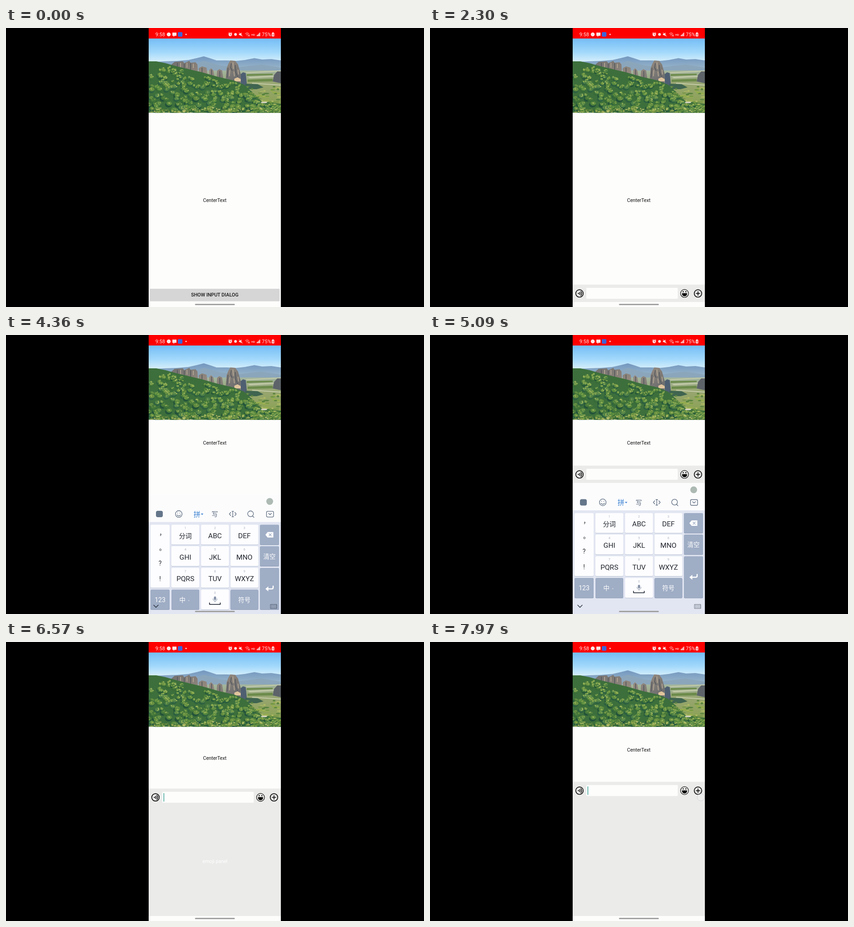
Write an HTML page that moves like this. It is 917x611 px and loops after 8000 ms.

```html
<!DOCTYPE html>
<html lang="en">
<head>
<meta charset="utf-8">
<title>Input dialog</title>
<style>
html, body { margin: 0; width: 100%; height: 100%; overflow: hidden; background: #000; }
svg { display: block; width: 917px; height: 611px; }
text { font-family: Roboto, "Noto Sans CJK SC", "Noto Sans CJK", sans-serif; text-anchor: middle; }
.line { fill: none; stroke-linecap: round; stroke-linejoin: round; }
</style>
</head>
<body>
<svg viewBox="0 0 917 611">
  <defs>
    <clipPath id="phone"><rect x="313" width="290" height="611"/></clipPath>
    <clipPath id="frame"><rect x="313" y="23" width="290" height="162.5"/></clipPath>
    <linearGradient id="sky" x2="0" y2="1">
      <stop offset="0" stop-color="#74bdf6"/><stop offset=".5" stop-color="#a2d8fb"/><stop offset=".85" stop-color="#d6effb"/>
    </linearGradient>
    <linearGradient id="hill" x2="0" y2="1">
      <stop offset="0" stop-color="#7397bf"/><stop offset="1" stop-color="#a6c0cd"/>
    </linearGradient>
    <linearGradient id="plain" x2="0" y2="1">
      <stop offset="0" stop-color="#a3b5a0"/><stop offset=".3" stop-color="#98a672"/><stop offset="1" stop-color="#86a048"/>
    </linearGradient>
    <linearGradient id="stone" x2=".9" y2=".3">
      <stop offset="0" stop-color="#71706f"/><stop offset=".5" stop-color="#94897e"/><stop offset="1" stop-color="#5d6369"/>
    </linearGradient>
  </defs>
  <rect width="917" height="611"/>
  <g clip-path="url(#phone)">
    <rect x="313" width="290" height="611" fill="#fdfdfc"/>

    <g clip-path="url(#frame)">
      <rect x="313" y="23" width="290" height="60" fill="url(#sky)"/>
      <path fill="url(#hill)" d="M313 75L345 73 375 72 400 70 418 66 434 62 447 66 462 71 485 71 505 72 524 70 545 66 562 69 582 68 603 71V100H313Z"/>
      <path fill="#8ba6bb" d="M400 84L434 72 470 82 510 86 560 80 603 87V104H400Z"/>
      <rect x="420" y="93" width="183" height="93" fill="url(#plain)"/>
      <path fill="#c4cba9" d="M525 97L603 93V95L528 99ZM530 107L603 104V106L535 110ZM540 120L603 124V126L540 122Z"/>
      <path fill="#6c8b4b" d="M528 101L585 100V103L528 105ZM530 113L585 111V117L530 118Z"/>
      <path fill="url(#stone)" d="M363 80L370 74 388 73 391 77 402 72 405 76 416 75 420 80 421 96H363ZM423 88L430 84 440 87 442 103H423ZM446 92L450 88 455 93 457 106H446ZM463 94L468 90 474 93 477 113H462ZM482 112L484 88 488 78 492 71 503 72 509 80 515 101 514 125H484ZM585 117L588 103 595 95 603 95V121Z"/>
      <path class="line" stroke="#575b60" stroke-width="1.800" d="M376 77v12M391 79v14M405 78v16M430 88v12M451 92v10M469 95v14M487 88l-2 20M494 78l-1 9 3 6M503 82l1 15 4 10"/>
      <path class="line" stroke="#b0a391" stroke-width="2" d="M383 77v8M397 77v9M411 79v8M498 76l1 13M491 93l-1 12M500 96l1 9M509 92l1 9"/>
      <path fill="#4f5f72" d="M515 101L520 97 526 99 529 130H515Z"/>
      <path fill="#3f6450" d="M525 122L552 123 565 130 550 134H525Z"/>
      <path fill="#e0c49c" d="M501 111L508 108 515 112V117H501Z"/>
      <path fill="#3d6f3c" d="M313 73L330 73 350 77 375 84 400 90 430 97 465 107 500 115 522 124 540 140 560 160 603 166V186H313Z"/>
      <g id="leaves"></g>
    </g>

    <rect x="313" width="290" height="23" fill="#f00"/>
    <g fill="#ffe6e6">
      <text x="338.3" y="18" font-size="11">9:58</text>
      <circle cx="357" cy="14" r="4.300"/>
      <path d="M365 10h9v7h-4l-2.500 2.500v-2.500h-2.500z"/>
      <rect x="377" y="9" width="10" height="10" rx="2" fill="#3f62d8"/>
      <circle cx="395" cy="14" r="1.500"/>
      <circle cx="492" cy="14.300" r="3.700"/>
      <circle cx="503.500" cy="14" r="3"/>
      <path d="M511 12.500h2.500l3-2.500v8l-3-2.500H511z"/>
      <text x="542" y="16.500" font-size="6" font-weight="500">HD</text>
      <text x="571.500" y="18" font-size="11">75%</text>
      <rect x="583" y="10.500" width="5.500" height="8" rx="1"/><rect x="584.500" y="9.500" width="2.500" height="2"/>
      <path d="M550 15.500h1.500V18H550zm2-1.500h1.500v4H552zm2-2h1.500v6H554zm2-2h1.500v8H556z"/>
    </g>
    <g class="line" stroke="#ffe6e6">
      <path d="M488 11.500l2-1.700M496 11.500l-2-1.700M511.500 10l7.500 8M525 12.500q4-3.500 8 0M526.800 14.800q2.200-2 4.400 0M529 17.200v.1M532 15v3M534 18v-3"/>
      <path stroke="#f00" stroke-width=".9" d="M492 12.300v2.300l1.700 .8M586.200 12.500l-1.200 2.300h1.700l-1.200 2.200"/>
    </g>

    <text id="label" x="458" font-size="10.700" fill="#111">CenterText</text>
    <g id="button">
      <rect x="315.500" y="571" width="285" height="27.500" rx="1.500" fill="#d6d6d6"/>
      <text x="458" y="587.700" font-size="10.700" font-weight="500" fill="#171717">SHOW INPUT DIALOG</text>
    </g>

    <g id="dialog">
      <rect x="313" width="290" height="340" fill="#ebebea"/>
      <rect x="343" y="7" width="200.500" height="24" rx="1.500" fill="#fdfdfc"/>
      <rect id="caret" x="345.800" y="10" width="1.200" height="18.500" fill="#12907f"/>
      <g class="line" stroke="#0a0a0a" stroke-width="1.700">
        <circle cx="328" cy="19.300" r="8.200"/>
        <circle cx="558.400" cy="19.300" r="8.700" stroke-width="1.200"/>
        <circle cx="587.900" cy="19.300" r="8.200"/>
        <path d="M584 19.300h7.800M587.900 15.400v7.800M328.300 16.800q2 2.500 0 5M331 14.800q3.600 4.500 0 9"/>
      </g>
      <path d="M552.900 18.800h11q0 6.700-5.500 6.700T552.900 18.800z"/>
      <circle cx="325.600" cy="19.300" r="1.300"/><circle cx="555.500" cy="15.500" r="1.300"/><circle cx="561.300" cy="15.500" r="1.300"/>
    </g>
    <text id="panel" x="458.500" y="484" font-size="10.700" fill="#fff">emoji panel</text>
    <rect x="313" y="600" width="290" height="11" fill="#fdfdfc"/>

    <g id="keyboard">
      <rect x="313" y="350" width="290" height="60" fill="#fcfcfd"/>
      <rect x="313" y="410" width="290" height="240" fill="#e2e6f2"/>
      <circle cx="578.500" cy="365" r="7.500" fill="#adbab3"/>
      <g id="tools">
        <rect x="329" y="385.500" width="15" height="14" rx="4" fill="#65768a"/>
        <g class="line" stroke="#5c6b7e" stroke-width="1.300">
          <circle cx="379" cy="392.500" r="7.300"/><path d="M375 394.500q4 4.500 8 0M376.500 390v.6M381.500 390v.6"/>
          <path d="M493 389l-3 3.500 3 3.500M502 389l3 3.500-3 3.500M495.500 386.500h4M497.500 386.500v12M495.500 398.500h4"/>
          <circle cx="536.500" cy="392" r="6.300"/><path d="M541 397l3 3"/>
          <rect x="571.500" y="386.500" width="15.500" height="12.500" rx="2.500"/><path d="M576 391l3.200 3 3.200-3"/>
        </g>
        <text x="419" y="398" font-size="15" font-weight="500" fill="#347dd0">拼</text>
        <path d="M427.500 391.500h5.500l-2.750 3z" fill="#347dd0"/>
        <text x="458" y="397.500" font-size="14" fill="#5c6b7e">写</text>
      </g>
      <g id="keys"></g>
      <path class="line" stroke="#111827" stroke-width="1.600" d="M446.500 587v3.500h23.500V587"/>
      <rect x="456" y="573" width="5" height="8" rx="2.500" fill="#8793a8"/>
      <path class="line" stroke="#8793a8" d="M454 578q0 5 4.500 5t4.500-5M458.500 583v2.500"/>
      <path fill="#fff" d="M569 438l5-6h12.500v12H574z"/>
      <path class="line" stroke="#9fadc5" stroke-width="1.500" d="M577 435.500l5 5M582 435.500l-5 5"/>
      <path class="line" stroke="#fff" stroke-width="2.600" d="M586 550.500v3q0 3-3 3h-9"/>
      <path fill="#fff" d="M569 556.500l6.500-5.500v11z"/>
    </g>
    <g id="navIcons" class="line" stroke="#222b38" stroke-width="1.300">
      <path d="M324 591.500l5 5 5-5"/>
      <path stroke-dasharray="1.200 2" stroke-linecap="butt" stroke="#56606f" d="M582 592h11M582 594.500h11M582 597h11"/>
      <rect x="580.500" y="590" width="13.500" height="9" stroke-width=".6"/>
    </g>
    <rect x="414.500" y="604" width="87.500" height="3" rx="1.500" fill="#a2a2a2"/>
    <circle id="touch" r="8" fill="#fff" stroke="#b9b9c2" stroke-width=".9"/>
  </g>
</svg>
<script>
const $ = id => document.getElementById(id);
const add = (parent, tag, attrs, text) => {
  const node = document.createElementNS('http://www.w3.org/2000/svg', tag);
  for (const k in attrs) node.setAttribute(k, attrs[k]);
  if (text) node.textContent = text;
  parent.append(node);
};

// Foliage: seeded round bushes, each a shadow, a body and sunlit tufts.
let seed = 11;
const rnd = () => (seed = seed * 16807 % 2147483647) / 2147483647;
const pick = list => list[Math.floor(rnd() * list.length)];
const blob = (cx, cy, rx, ry, fill) => add($('leaves'), 'ellipse', { cx, cy, rx, ry, fill });
const treeLine = x => x < 335 ? 75 : x < 522 ? 75 + (x - 335) * .26 : Math.min(165, 124 + (x - 522) * 1.05);
const shadows = ['#23533a', '#2d6040', '#376a38'];
const bodies = ['#47793a', '#588a3e', '#668f40', '#4f8148'];
const lights = ['#7fa34b', '#92b054', '#a9bd62', '#6f9a48', '#48783a'];

for (let i = 0; i < 60; i++) {
  blob(530 + rnd() * 73, 128 + rnd() * 42, 2 + rnd() * 5, .8 + rnd() * 1.5, pick(['#6f9440', '#94ac4f', '#5a8440', '#adb964']));
}
blob(566, 163, 7, 1.6, '#dcd9cb');
const BUSHES = 260;
for (let i = 0; i < BUSHES; i++) {
  const x = 312 + rnd() * 292, top = treeLine(x) + 3, depth = i / BUSHES;
  const y = top + (186 - top) * depth, r = 3 + rnd() * 3 + depth * 3;
  blob(x - 1, y + r * .4, r, r * .75, pick(shadows));
  blob(x + .5, y, r * .8, r * .6, pick(bodies));
  for (let j = 0; j < 8; j++) {
    const a = rnd() * 6.28, d = rnd() * r * .8;
    blob(x + 1 + Math.cos(a) * d, y - 1 + Math.sin(a) * d * .65, .6 + rnd() * 1.2, .5 + rnd() * .8, pick(lights));
  }
}
for (let i = 0; i < 150; i++) {
  blob(313 + rnd() * 290, 175 + rnd() * 11, 1 + rnd() * 2, .6 + rnd(), pick(['#a9b35c', '#8ea24b', '#bfc573', '#5d7f3a']));
}

const keys = $('keys');
const key = (x, y, w, h, dark) => {
  add(keys, 'rect', { x, y: y + 1, width: w, height: h, rx: 2.5, fill: dark ? '#8f9db6' : '#b9c1d3' });
  add(keys, 'rect', { x, y, width: w, height: h, rx: 2.5, fill: dark ? '#9fadc5' : '#fdfdff' });
};
const glyph = (s, x, y, size, fill) => add(keys, 'text', { x, y, 'font-size': size, fill }, s);
const cols = [363, 428, 492.5], rows = [416, 463, 510.5, 558];
['分词', 'ABC', 'DEF', 'GHI', 'JKL', 'MNO', 'PQRS', 'TUV', 'WXYZ'].forEach((s, i) => {
  const x = cols[i % 3], y = rows[i / 3 | 0];
  key(x, y, 61, 43.5);
  glyph(s, x + 30.5, y + 29, i ? 15.5 : 14, '#20242c');
  glyph(String(i + 1), x + 30.5, y + 9.5, 7, '#aab2c0');
});
key(317, 416, 42, 138);
[['，', 343, 438], ['。', 343, 471], ['?', 338, 505], ['!', 338, 539]].forEach(([s, x, y]) => glyph(s, x, y, 14, '#20242c'));
key(557, 416, 42, 43.5, true);
key(557, 463, 42, 43.5, true);
key(557, 510.5, 42, 91, true);
key(317, 558, 42, 43.5, true);
key(363, 558, 61, 43.5, true);
key(428, 558, 61, 43.5);
key(492.5, 558, 61, 43.5, true);
glyph('清空', 578, 490, 13.5, '#fff');
glyph('123', 338, 585, 14, '#fff');
glyph('中', 387, 585, 13.5, '#fff');
glyph('※', 401, 583, 6, '#dfe5ef');
glyph('符号', 523, 585, 13.5, '#fff');
glyph('0', 458.5, 567.5, 7, '#aab2c0');

const LOOP = 8000, KB_TRAVEL = 276;
const linear = p => p;
const outCubic = p => 1 - (1 - p) ** 3;
const inCubic = p => p ** 3;
const inOut = p => (1 - Math.cos(Math.PI * p)) / 2;
// Each move: start, end, target, easing.
const track = (t, value, moves) => {
  for (const [a, b, to, ease] of moves) {
    if (t < a) break;
    value += (to - value) * ease(Math.min(1, (t - a) / (b - a)));
  }
  return value;
};
const barMoves = [[1900, 2220, 562, outCubic], [4460, 4820, 286, inOut], [6210, 6580, 321, inOut], [7800, 8180, 286, inOut]];
const kbMoves = [[4160, 4527, 0, outCubic], [6080, 6328, KB_TRAVEL, inCubic]];
const labelSteps = [[4200, 236], [6100, 254], [7780, 236]];
const caretOn = [[4400, 5090], [5610, 6830], [7330, 8000]];
const touches = [[1700, 1850, 536, 580], [3640, 3790, 506, 584], [5900, 6200, 558, 301], [7720, 8000, 594, 340]];
const within = (t, a, b) => t >= a && t < b;
const show = (id, on) => $(id).setAttribute('visibility', on ? 'visible' : 'hidden');
const place = (id, x, y) => $(id).setAttribute('transform', `translate(${x} ${y})`);

function draw(t) {
  place('dialog', 0, track(t, 600, barMoves));
  show('dialog', t >= 1900);
  show('button', t < 2220);
  const label = labelSteps.reduce((y, [at, to]) => t >= at ? to : y, 377);
  $('label').setAttribute('y', label + 3.7);
  show('caret', caretOn.some(([a, b]) => within(t, a, b)));
  show('panel', within(t, 6100, 7780));

  place('keyboard', 0, track(t, KB_TRAVEL, kbMoves) - 26);
  $('keyboard').setAttribute('opacity', track(t, 1, [[6080, 6328, 0, linear]]));
  show('keyboard', within(t, 4160, 6328));
  show('tools', within(t, 4160, 6080));
  show('navIcons', within(t, 4260, 6080));

  const tap = touches.find(([a, b]) => within(t, a, b));
  show('touch', tap);
  if (tap) place('touch', tap[2], tap[3]);
  $('touch').setAttribute('fill-opacity', t < 5000 ? .75 : .15);
  $('touch').setAttribute('stroke-opacity', t < 5000 ? 1 : .55);
}

const start = performance.now();
(function frame() {
  draw((performance.now() - start) % LOOP);
  requestAnimationFrame(frame);
})();
</script>
</body>
</html>
```
